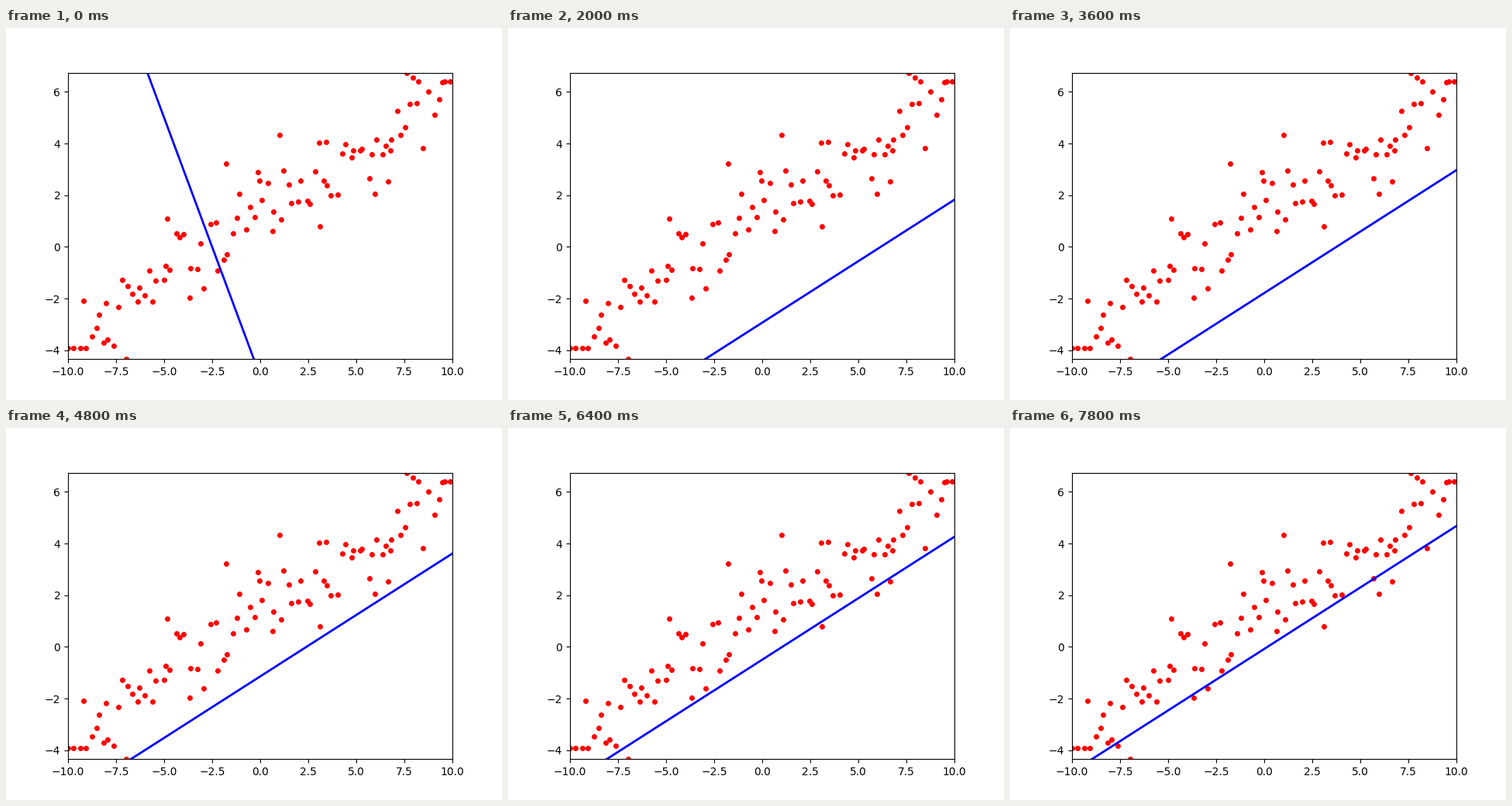
These frames come from a looping animation (640 px wide and 480 px high, 8000 ms). A matplotlib script:

```python
import numpy as np
import matplotlib.pyplot as plt
from matplotlib.animation import FuncAnimation

STEPS = 40
INTERVAL = 200
RATE = 0.04                   # learning rate times two (squared error)
SLOPE, OFFSET = 0.4755, 1.18  # least-squares fit of the samples
START = (-2.0, -5.0)
MEAN_XX = 31.2                # mean of x squared; mean of x is about zero
YLIM = (-4.338, 6.742)

# Points that stand out from the band
OUTLIERS = np.array([
    (-8.15, -3.70), (-6.96, YLIM[0]), (-4.82, 1.08), (-1.77, 3.23),
    (-0.12, 2.90), (1.01, 4.34), (3.11, 0.80), (3.43, 4.07),
    (5.98, 2.06), (6.67, 2.54), (7.64, YLIM[1]), (7.95, 6.54),
])


def scatter_band(count, seed=3):
    """Noisy samples around the fitted line, spread evenly over x."""
    rng = np.random.default_rng(seed)
    x = -10 + 20 * (np.arange(count) + rng.random(count)) / count
    noise = np.clip(rng.normal(0, 0.8, count), -1.4, 1.4)
    y = np.clip(SLOPE * x + OFFSET + noise, -3.9, 6.4)
    return x, y


def fit_at(step):
    """Slope and offset after a number of gradient descent steps."""
    w = SLOPE + (START[0] - SLOPE) * (1 - RATE * MEAN_XX) ** step
    b = OFFSET + (START[1] - OFFSET) * (1 - RATE) ** step
    return w, b


fig, ax = plt.subplots(figsize=(6.4, 4.8), dpi=100)
for x, y in (scatter_band(100 - len(OUTLIERS)), OUTLIERS.T):
    ax.plot(x, y, "ro", markersize=4)
line, = ax.plot([], [], "b-", linewidth=2)
ax.set_xlim(-10, 10)
ax.set_ylim(*YLIM)
ends = np.array([-10.0, 10.0])


def update(i):
    w, b = fit_at(i)
    line.set_data(ends, w * ends + b)
    return line,


anim = FuncAnimation(fig, update, frames=STEPS, interval=INTERVAL,
                     repeat=True, repeat_delay=0)
plt.show()
```
